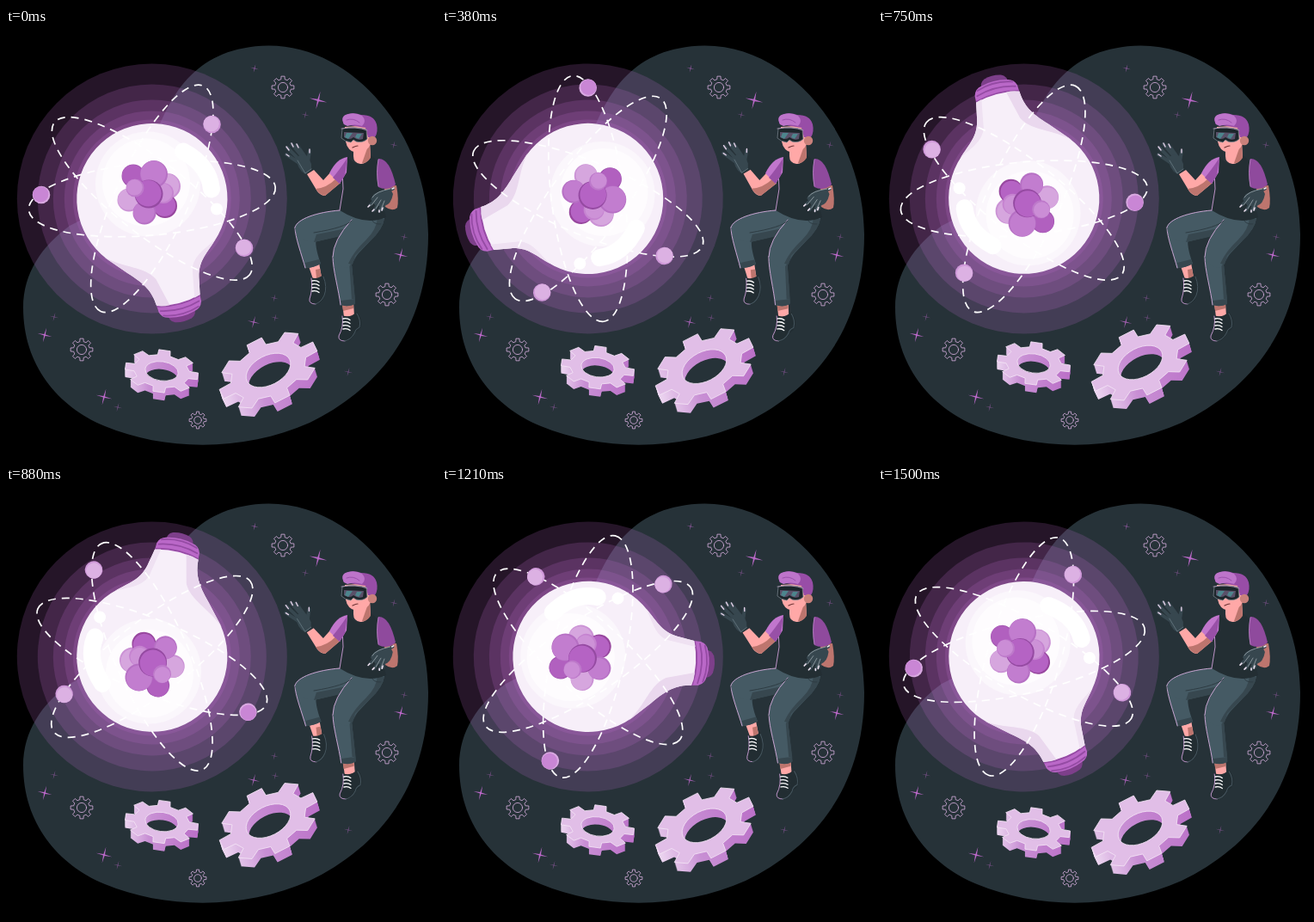
Recreate the animation shown at these times as an HTML page. Size 500x500 px, loop 1.54 s.

```html
<!DOCTYPE html>
<html lang="en">
<head>
<meta charset="utf-8">
<title>Bulb atom</title>
<style>
  html, body { margin: 0; width: 100%; height: 100%; overflow: hidden; background: #000; }
  svg { display: block; width: 100vw; height: 100vh; }
  .line { fill: none; stroke-linecap: round; stroke-linejoin: round; }
  .fine { vector-effect: non-scaling-stroke; }
</style>
</head>
<body>
<svg id="stage" viewBox="0 0 500 500"></svg>
<script>
const PURPLE = '#ba68c8', LIGHT = '#e1bee7', SKIN = '#ffa8a7', SHADE = '#bd756e';
const DARK = '#263238', SLATE = '#37474f', PANTS = '#455a64', EDGE = '#d9b0e0';
const CX = 169.8, CY = 198.4;

const circle = (x, y, r, fill, extra = '') => `<circle cx="${x}" cy="${y}" r="${r}" fill="${fill}" ${extra}/>`;
const shape = (d, fill, extra = '') => `<path d="${d}" fill="${fill}" ${extra}/>`;
const line = (d, color, width = 1) => `<path class="line" d="${d}" stroke="${color}" stroke-width="${width}"/>`;
const group = (id, content) => `<g id="${id}">${content}</g>`;
const ball = (x, y, r, fill, rim) => circle(x, y, r, rim) + circle(x - .7, y - .7, r - 1.2, fill);

// Eight-toothed wheel of radius 1 with a round hole
function wheel(valley, hole) {
  const points = [];
  for (let i = 0; i < 8; i++) {
    for (const [a, r] of [[-13, valley], [-9, 1], [9, 1], [13, valley]]) {
      const t = (i * 45 + a) * Math.PI / 180;
      points.push(`${(r * Math.cos(t)).toFixed(3)} ${(r * Math.sin(t)).toFixed(3)}`);
    }
  }
  return `M${points.join('L')}ZM${hole} 0A${hole} ${hole} 0 1 0 ${-hole} 0A${hole} ${hole} 0 1 0 ${hole} 0Z`;
}

// axes: the two projected radius vectors, as "ux uy vx vy"
function solidGear(x, y, axes, depth, lean) {
  const d = wheel(0.76, 0.45);
  let out = '';
  for (let k = depth; k >= 0; k--) {
    const top = k === 0;
    out += shape(d, top ? LIGHT : 'url(#side)', `class="fine" fill-rule="evenodd" stroke-width=".8"
      stroke="${top ? '#f5e8f7' : 'none'}" transform="matrix(${axes} ${x + lean * k} ${y + k})"`);
  }
  return out;
}

const miniGear = (x, y, r) => `<path class="line fine" d="${wheel(0.74, 0.43)}" stroke="${EDGE}"
  stroke-width=".8" transform="translate(${x} ${y}) scale(${r})"/>`;

const star = (x, y, r, opacity) => shape('M0-1L.09-.09L1 0L.09.09L0 1L-.09.09L-1 0L-.09-.09Z', PURPLE,
  `opacity="${opacity}" transform="translate(${x} ${y}) rotate(14) scale(${r})"`);

function backdrop() {
  const stars = [[363, 84, 10.5, 1], [289, 47, 5, .7], [348, 101, 5, .5], [451, 136, 5, .5], [463, 243, 5, .5],
    [459, 264, 8.5, 1], [312, 314, 5, .5], [313, 337, 5, .5], [288, 342, 7.5, .8], [398, 400, 5.5, .5],
    [130, 441, 5.5, .5], [114, 429, 9.5, 1], [56, 336, 5.5, .5], [45, 357, 8.5, 1]];
  const gears = [[322, 69, 13], [88, 374, 13], [443, 310, 13], [223, 456, 10]];
  return shape(`M305 20.5C405 20 491 125 491 240C491 354 429 422 353 459C277 493 185 492 115 463
    C60 440 20 392 20 325C20 285 42 253 74 230C115 210 150 185 172 130C192 75 222 22 305 20.5Z`, DARK)
    + stars.map(s => star(...s)).join('') + gears.map(g => miniGear(...g)).join('');
}

function bulb() {
  const body = `M-26 122C-27 104-33 94-49 77L-63 61A87.6 87.6 0 1 1 64 60C46 78 35 82 30 102L26 122Q0 129-26 122Z`;
  const glass = shape('M-16 134L16 134Q17 143 10 146Q0 149-10 146Q-17 143-16 134Z', '#7d3f8a')
    + shape('M-26 120L26 120L25.5 130Q23 138 15 139Q0 143-15 139Q-23 138-25.5 130Z', PURPLE)
    + [123, 129, 135].map((y, i) => line(`M${-25 + i * 2} ${y}Q0 ${y + 7} ${25 - i * 2} ${y}`, '#954ba4', 1.8)).join('')
    + shape(body, '#f7eff9')
    + shape('M-26 122C-27 104-33 94-49 77L-71 52C-52 70-28 74-19 92L-11 125Q-19 125-26 122Z', '#ead8ee')
    + shape('M26 122L30 102C35 82 46 78 60 64C46 72 30 76 25 91L19 124Z', '#efe1f2');
  return `<g transform="translate(${CX} ${CY}) rotate(-14.5)">${glass}</g>`
    + circle(165, 181.5, 61, '#fbf7fc') + circle(163, 179.5, 51, '#fff', 'opacity=".7"')
    + line('M206 143.5Q236 159.5 239 187.5', '#fff', 20) + circle(245, 210.5, 7, '#fff');
}

function nucleus() {
  return [[148, 172, 13.5, '#b160bf', '#a055ae'], [188, 184, 15, '#d6a6de', '#cb92d5'],
    [143, 200, 13.5, '#d6a6de', '#cb92d5'], [185, 207, 14, '#b563c4', '#98489f'],
    [183, 192, 12, '#cd92d7', '#c583d0'], [161, 215, 13.5, '#c27dcf', '#b670c4'],
    [172, 170, 16, '#c27dcf', '#b670c4'], [166, 193, 16.5, '#b563c4', '#954aa2'],
    [150, 186, 10.5, '#cb8dd6', '#bd79ca']].map(b => ball(...b)).join('');
}

function atom() {
  const glow = [157, 133, 115, 102, 92].map(r => circle(CX, CY, r, PURPLE, 'opacity=".2"')).join('');
  const orbits = [-5.3, 38, 114.5].map(a => `<ellipse class="line" cx="${CX}" cy="${CY}" rx="144" ry="42.5"
    transform="rotate(${a} ${CX} ${CY})" stroke="#fff" stroke-width="1.7" stroke-dasharray="9 7"
    style="stroke-linecap:butt"/>`).join('');
  return glow + bulb() + orbits + nucleus()
    + ball(41, 194, 10.3, '#c986d5', '#d9a9e1') + ball(239.5, 112, 10.3, '#dcb1e3', '#cf98d9')
    + ball(277, 255.7, 10.3, '#dcb1e3', '#cf98d9');
}

const laces = (x, y, n) => Array.from({ length: n }, (_, i) =>
  line(`M${x} ${y + i * 4}Q${x + 5} ${y + i * 4 - 1} ${x + 8} ${y + i * 4 + 1.5}`, '#fff', 1.3)).join('');

function person() {
  const leftShin = shape('M351 274L364 273L367 290L357 292Z', SKIN) + shape('M360 281L365 280L367 290L361 291Z', SHADE)
    + shape('M355 290Q361 293 369 287Q375 300 371 311Q366 322 358 322Q351 321 354 314Q357 302 355 290Z', '#222d32')
    + line('M355 291Q357 303 353 315Q352 321 360 321', '#cfa0d8', .9)
    + line('M369 289Q374 301 370 311Q366 320 359 321', '#46565f', 1) + laces(356, 294, 4)
    + shape('M336 231C336 243 344 264 348 279Q358 279 366 274C361 260 359 250 361 242Z', PANTS)
    + shape('M348 273L364 269L366 274Q357 279 349 279Z', SLATE)
    + line('M336 232C336 243 344 264 348 279', EDGE, .9);
  const rightShin = shape('M391 320L404 319L405 335L393 336Z', SKIN) + shape('M391 322H404V326L392 329Z', SHADE)
    + shape('M391 334Q400 338 408 330Q414 338 413 346Q411 352 406 354Q402 365 392 365Q384 363 388 357Q393 346 391 334Z', '#222d32')
    + line('M391 335Q393 347 387 358Q386 364 394 364', '#cfa0d8', .9)
    + line('M408 332Q413 340 411 348Q406 350 405 355Q401 363 393 364', '#46565f', 1) + laces(392, 338, 4)
    + shape('M380 265C380 280 387 305 389 322Q399 325 406 320L402 275L410 258Z', PANTS)
    + shape('M389 317L406 315V321Q398 325 390 322ZM402 275L413 256L399 271L402 316L406 315Z', SLATE)
    + line('M380 266C380 281 387 305 389 322', EDGE, .9);
  const thighs = shape('M389 212C362 214 338 222 336 232Q338 248 358 249L395 240L425 219Z', PANTS)
    + shape('M358 249L361 240L401 232L394 241Z', SLATE)
    + shape('M440 221Q438 234 424 247L407 265L398 279Q384 279 380 266Q381 246 402 224L389 213L415 215Z', PANTS)
    + shape('M440 222Q438 234 424 247L406 265L403 275L398 274Q404 260 419 246Q431 234 432 221Z', SLATE)
    + line('M388 212C362 214 338 222 336 232M402 223Q380 247 380 266', EDGE, .9)
    + line('M402 224Q395 232 358 238M424 221Q427 229 436 228', '#2e3c43', 1);
  const torso = shape('M397 150Q404 158 412 159Q420 158 424 148Q433 152 433 168L434 190L442 220Q418 231 388 212L391 184L388 169Z', '#232e33')
    + line('M391 166L392 187L388 212', '#cfa0d8', .9);
  const leftSleeve = shape('M397 150Q384 152 376 169L388 181L396 168Z', '#c176cd')
    + shape('M397 151Q387 166 380 174L388 181L394 171Z', '#9850a7');
  const rightArm = shape('M440 184L454 183Q457 200 455 209Q449 214 441 208Z', SHADE)
    + shape('M433 152Q446 151 453 182Q444 190 433 185Q430 168 433 152Z', '#8f4a9d')
    + line('M433 153Q430 168 433 184', '#c98dd4', .8);
  const head = shape('M404 139L423 132L424 150Q418 159 412 158Q404 157 404 149Z', SKIN)
    + shape('M423 135L424 151Q419 158 414 157L420 140Z', SHADE)
    + shape('M394 115L424 113V135Q420 145 407 145Q397 143 395 132Z', SKIN)
    + shape('M393 112Q388 102 398 100Q406 98 413 101Q428 101 431 112Q433 121 429 127L421 127L418 116Z', '#984da7')
    + shape('M393 112Q388 102 398 100Q406 98 414 102Q420 108 414 114Q405 111 397 114Z', '#bd74ca')
    + line('M396 107Q404 104 411 110', '#984da7', .9)
    + circle(426, 131, 5.2, '#c9817b') + line('M403 139Q407 137 409 137', '#6e3435', 1.2)
    + shape('M391 117Q406 114 419 118L420 129Q415 134 407 132L404 130L401 133Q394 132 390 128Z', '#1c262b',
      'stroke="#75818a" stroke-width=".8"')
    + shape('M393 121L416 122L415 129Q409 131 404 127Q400 131 393 127Z', '#5a5069')
    + shape('M396 122L403 122L398 129L394 127ZM408 123L414 123L410 129L406 127Z', '#4d858d')
    + line('M390 117Q407 114 420 119', '#b4a0bb', .8);
  const leftArm = shape('M350 170L358 165L369 177L378 167L389 180L371 195Q366 195 362 190Z', SKIN)
    + shape('M360 187Q373 186 384 175L389 180L371 195Q366 195 360 187Z', SHADE)
    + line('M341 157L326 147M341 153L327 139M344 149L332 135M348 150L338 136M351 156L353 143', SLATE, 4)
    + shape('M338 151Q345 143 352 151L355 158V164L348 170Q338 164 338 151Z', SLATE)
    + line('M326 147L329 149M326 138L329 142M332 134L334 138M338 135L340 139M353 141V145', '#e3d0e7', 1.4)
    + line('M339 154L348 169L355 164', '#62747d', .9);
  const rightHand = line('M434 196L423 206M437 198L428 212M440 199L434 213M442 198L438 211M439 192L450 187', SLATE, 3.5)
    + shape('M424 199Q427 191 438 189L447 187L450 193Q448 205 440 207L430 207Z', SLATE)
    + line('M423 206L421 208M428 211L426 213M434 212L434 214M438 209L437 212M449 187L451 186', '#f0e3f2', 1.6)
    + line('M432 197L425 206M436 200L430 210M440 201L436 211M426 197Q430 190 447 187', '#9aa6ac', .8);
  return group('leftShin', leftShin) + group('rightShin', rightShin) + thighs + torso + head
    + rightArm + group('rightHand', rightHand) + group('leftArm', leftArm) + leftSleeve;
}

const stage = document.getElementById('stage');
stage.innerHTML = `<defs><linearGradient id="side">
    <stop offset="0" stop-color="#ecd5f0"/><stop offset=".35" stop-color="#c88fd4"/>
    <stop offset="1" stop-color="#bb70c8"/></linearGradient></defs>`
  + backdrop() + group('atom', atom())
  + group('gears', solidGear(181, 399, '42.5 6 -3.5 24.5', 9, 0) + solidGear(305, 398, '55 -28 16.5 34', 10, .3))
  + person();

const turn = (id, angle, x, y) =>
  document.getElementById(id).setAttribute('transform', `rotate(${angle} ${x} ${y})`);

// Poses hold at 24 per second; the turn itself advances in 4 degree ticks
function draw(now) {
  const ms = Math.floor(now % 1540 / 10) * 10;
  const pose = Math.floor((ms + 4.9) * 24 / 1000);
  const angle = 4 * Math.min(88, Math.floor(pose * 2.5));
  const phase = angle * Math.PI / 180, sway = Math.sin(phase);
  turn('atom', angle, CX, CY);
  turn('leftShin', 1.3 * sway, 346, 232);
  turn('rightShin', 1.4 * sway, 392, 262);
  turn('leftArm', 1.8 * sway, 370, 186);
  turn('rightHand', 2.5 * sway, 446, 204);
  document.getElementById('gears').setAttribute('transform', `translate(0 ${-4.5 * (1 - Math.cos(phase))})`);
}

const start = performance.now();
function tick() {
  draw(performance.now() - start);
  requestAnimationFrame(tick);
}
tick();
</script>
</body>
</html>
```
